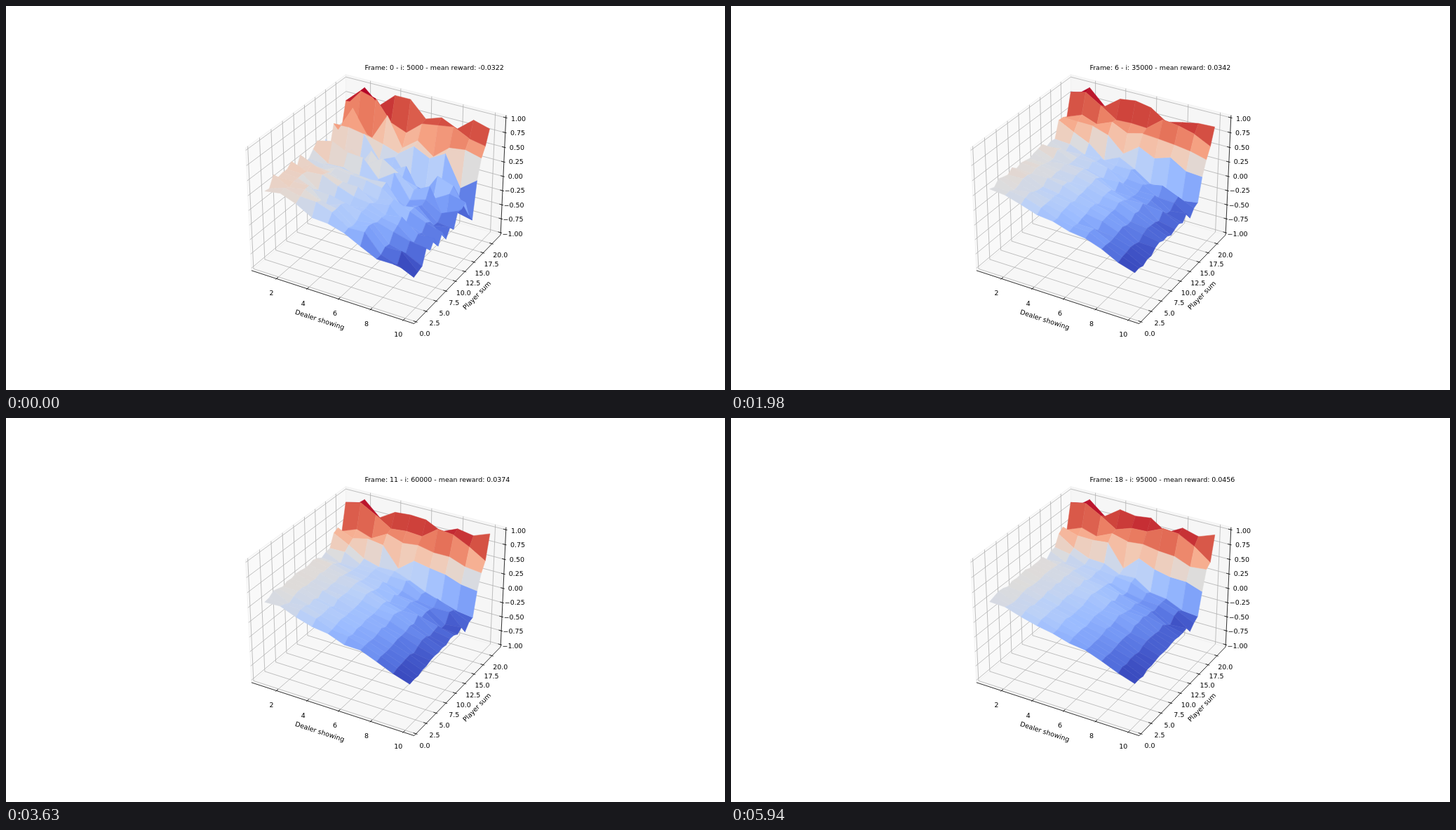
Animation of 1025 by 547 pixels, one loop 6270 ms. Source, as an HTML page with a canvas:

```html
<!DOCTYPE html>
<html lang="en">
<head>
<meta charset="utf-8">
<title>Value surface</title>
<style>
html, body { margin: 0; width: 100%; height: 100%; overflow: hidden; background: #fff; }
canvas { display: block; }
</style>
</head>
<body>
<canvas id="stage" width="1025" height="547"></canvas>
<script>
const ctx = document.getElementById('stage').getContext('2d');
const STEP = 330, STEPS = 19, DEALER = 10, SUMS = 21;
const E = 0.5952, H = 0.4464; // half sizes of the axes box

// [step, mean reward]
const rewards = [[0, -.0322], [2, -.023], [3, -.0058], [4, .0286], [6, .0342], [9, .033], [14, .044], [18, .0456]];
// [player sum, value at dealer 1, value at dealer 10]
const profile = [[1, .33, -.31], [11, .36, -.22], [15, .33, -.3], [16, .33, -.2], [17, .45, -.18],
  [18, .6, .17], [19, .66, .5], [20, .85, .73], [21, .85, 1]];
// [dealer, value at player sum 21]
const crest = [[1, .85], [2, 1], [3, .79], [5, 1], [6, 1], [7, .82], [8, .94], [9, .88], [10, 1]];

const coolwarm = ['3b4cc0', '5673e0', '779af7', '9abbff', 'bad0f8', 'dddcdc', 'f2cab5', 'f7a889',
  'e97a5f', 'cf453c', 'b40426'].map((h, n) => [n / 10, ...[0, 2, 4].map(i => parseInt(h.slice(i, i + 2), 16))]);

// linear interpolation between key points
function at(keys, t) {
  const n = Math.max(1, keys.findIndex(key => key[0] >= t));
  const a = keys[n - 1], b = keys[n], u = (t - a[0]) / (b[0] - a[0]);
  return a.slice(1).map((v, i) => v + (b[i + 1] - v) * u);
}

function rand(a, b, c) {
  let h = Math.imul(a + 11, 374761393) ^ Math.imul(b + 7, 668265263) ^ Math.imul(c + 3, 1274126177);
  h = Math.imul(h ^ (h >>> 13), 1274126177);
  h = Math.imul(h ^ (h >>> 15), 2246822519);
  return ((h ^ (h >>> 16)) >>> 0) / 2147483648 - 1;
}

// each step averages in one more noisy batch
function meanNoise(x, y, k) {
  let sum = 0;
  for (let j = 0; j <= k; j++) sum += rand(x, y, j);
  return sum / (k + 1);
}

const bell = (v, mid, width) => Math.exp(-(((v - mid) / width) ** 2));

function settled(x, y) {
  if (y === SUMS) return at(crest, x)[0];
  const [a, b] = at(profile, y), u = (x - 1) / 9;
  const bend = .07 * Math.sin(Math.PI * u) * (y < 17);
  const zigzag = .27 * Math.cos(Math.PI * x) * bell(x, 5, 1.3) * bell(y, 18, .5);
  const wave = .12 * Math.cos((x - 1.8) * 1.14) * bell(y, 20, .5);
  return a + (b - a) * u + bend + zigzag + wave;
}

function value(x, y, k) {
  const amp = .12 + .2 * bell(y, 18, 6);
  const dip = .14 * (x / 10) ** 2 * Math.exp(-y / 3 - k / 3);
  return Math.min(1, settled(x, y) + amp * meanNoise(x, y, k) - dip);
}

const wx = x => (x - 5.5) / 9.9 * 1.14286;
const wy = y => (y - 11) / 22 * 1.14286;
const wz = z => z * 0.42857;

// camera at elevation 30, azimuth -60, distance 10
function project([x, y, z]) {
  const d = 10 - .4330 * x + .75 * y - .5 * z, s = 2232 / d;
  return [530.8 + s * (.8660 * x + .5 * y), 266.6 - s * (-.25 * x + .4330 * y + .8660 * z), d];
}

function path(points) {
  ctx.beginPath();
  points.forEach(p => ctx.lineTo(p[0], p[1]));
}

function line(style, ...points) {
  path(points.map(project));
  ctx.strokeStyle = style;
  ctx.lineWidth = .8;
  ctx.stroke();
}

function polygon(points, fill, stroke, width) {
  path(points);
  ctx.closePath();
  ctx.fillStyle = fill;
  ctx.fill();
  ctx.strokeStyle = stroke;
  ctx.lineWidth = width;
  ctx.stroke();
}

const pane = (fill, ...corners) => polygon(corners.map(project), fill, '#f0f0f0', .8);

function label(text, x, y, angle = 0) {
  ctx.save();
  ctx.translate(x, y);
  ctx.rotate(angle * Math.PI / 180);
  ctx.fillText(text, 0, 3.6);
  ctx.restore();
}

function drawAxes() {
  const grid = '#b0b0b0', out = .0095, inn = .019;
  const range = (n, f) => Array.from({ length: n }, (_, i) => f(i));
  const xs = range(5, i => 2 + 2 * i), ys = range(9, i => 2.5 * i), zs = range(9, i => 1 - i / 4);
  pane('#f9f9f9', [-E, -E, -H], [-E, E, -H], [-E, E, H], [-E, -E, H]);
  pane('#f6f6f6', [-E, E, -H], [E, E, -H], [E, E, H], [-E, E, H]);
  pane('#f7f7f7', [-E, -E, -H], [E, -E, -H], [E, E, -H], [-E, E, -H]);
  xs.forEach(v => line(grid, [wx(v), -E, -H], [wx(v), E, -H], [wx(v), E, H]));
  ys.forEach(v => line(grid, [E, wy(v), -H], [-E, wy(v), -H], [-E, wy(v), H]));
  zs.forEach(v => line(grid, [-E, -E, wz(v)], [-E, E, wz(v)], [E, E, wz(v)]));

  line('#000', [-E, -E, -H], [E, -E, -H], [E, E, -H], [E, E, H]);
  ctx.fillStyle = '#000';
  ctx.textAlign = 'center';
  xs.forEach((v, i) => {
    line('#000', [wx(v), -E - out, -H], [wx(v), -E + inn, -H]);
    label(v, 378.5 + 45.2 * i, 408 + 14.9 * i);
  });
  ys.forEach((v, i) => {
    line('#000', [E + out, wy(v), -H], [E - inn, wy(v), -H]);
    label(v.toFixed(1), 597 + 14.2 * i - .09 * i * i, 466.5 - 15 * i + .12 * i * i);
  });
  zs.forEach((v, i) => {
    line('#000', [E + out, E, wz(v)], [E - inn, E, wz(v)]);
    label(v.toFixed(2).replace('-', '\u2212'), 730.5 - 1.06 * i, 160.3 + 20.45 * i);
  });
  label('Dealer showing', 447.5, 446.5, 18.1);
  label('Player sum', 671, 412, -46);
}

function drawSurface(k) {
  const vertex = (x, y) => {
    const z = value(x, y, k);
    return { z, p: project([wx(x), wy(y), wz(z)]) };
  };
  const quads = [];
  for (let y = 1; y < SUMS; y++) {
    for (let x = 1; x < DEALER; x++) {
      const c = [vertex(x, y), vertex(x + 1, y), vertex(x + 1, y + 1), vertex(x, y + 1)];
      quads.push({
        points: c.map(v => v.p),
        z: c.reduce((s, v) => s + v.z, 0) / 4,
        depth: c.reduce((s, v) => s + v.p[2], 0)
      });
    }
  }
  const levels = quads.map(q => q.z), low = Math.min(...levels), high = Math.max(...levels);
  quads.sort((a, b) => b.depth - a.depth);
  for (const q of quads) {
    const color = `rgb(${at(coolwarm, (q.z - low) / (high - low)).map(Math.round)})`;
    polygon(q.points, color, color, .5);
  }
}

function draw(k) {
  ctx.fillStyle = '#fff';
  ctx.fillRect(0, 0, 1025, 547);
  ctx.font = '9.45px "DejaVu Sans", sans-serif';
  ctx.lineJoin = 'round';
  drawAxes();
  drawSurface(k);
  const reward = Number((Math.round(at(rewards, k)[0] * 5000) / 5000).toFixed(4));
  ctx.fillStyle = '#000';
  ctx.textAlign = 'left';
  ctx.fillText(`Frame: ${k} - i: ${5000 * (k + 1)} - mean reward: ${reward}`, 511.5, 91);
}

let shown = -1;
const start = performance.now();
function tick() {
  const k = Math.floor((performance.now() - start) / STEP) % STEPS;
  if (k !== shown) draw(shown = k);
  requestAnimationFrame(tick);
}
tick();
</script>
</body>
</html>
```
